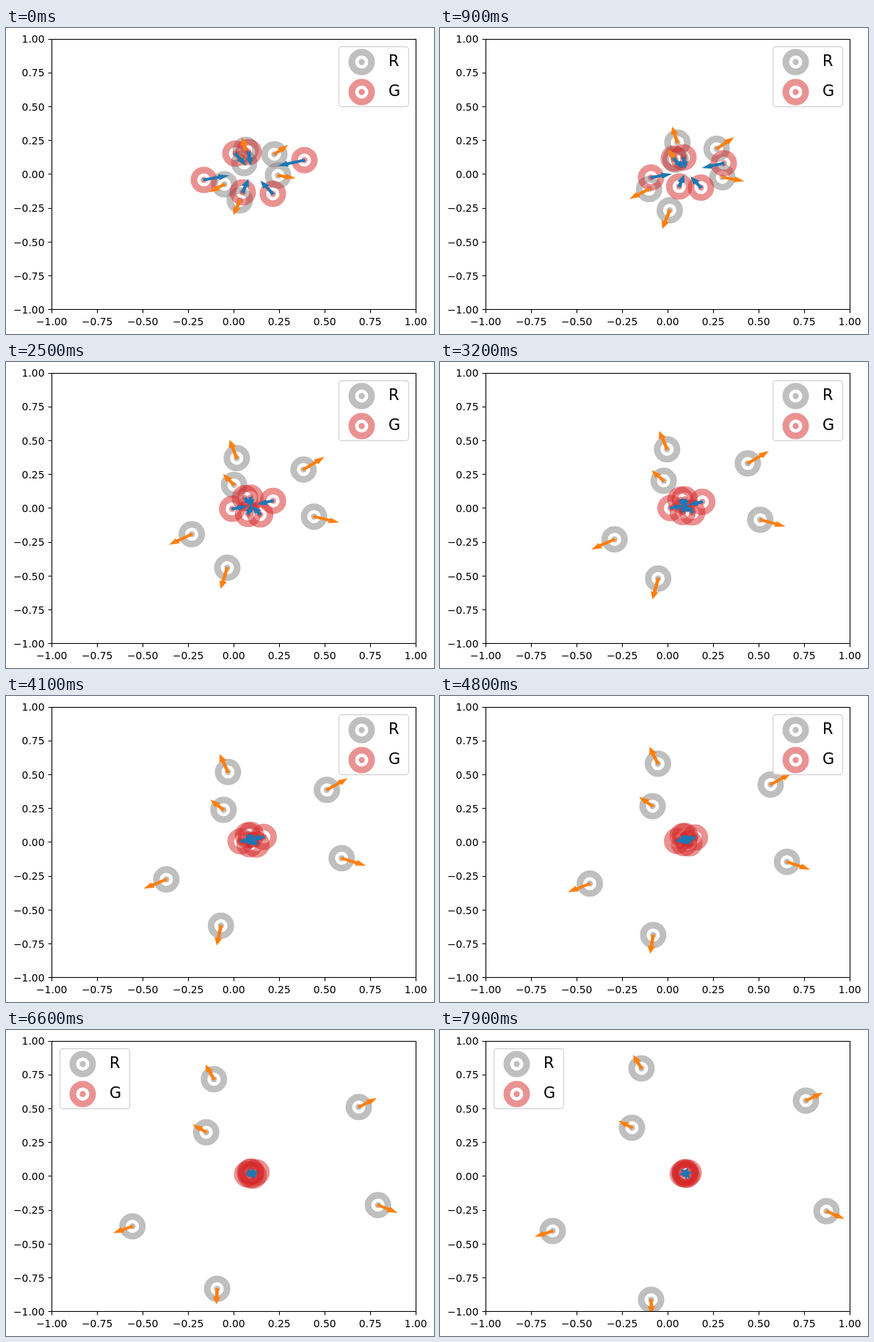
Animation, 583 px wide and 418 px high, one loop 8 s. Source, as an HTML page:

```html
<!DOCTYPE html>
<html lang="en">
<head>
<meta charset="utf-8">
<title>Agents</title>
<style>
  html, body { margin: 0; width: 100%; height: 100%; overflow: hidden; background: #fff; }
  svg { display: block; width: 583px; height: 418px; font: 13.89px "DejaVu Sans", sans-serif; }
  .axis { fill: none; stroke: #000; stroke-width: 1.1; }
  .arrow { stroke-width: 1.9; stroke-linejoin: miter; stroke-miterlimit: 10; vector-effect: non-scaling-stroke; }
</style>
</head>
<body>
<svg id="stage" viewBox="0 0 583 418">
  <clipPath id="plot"><rect x="62" y="15" width="497" height="370"/></clipPath>
  <g id="agents" clip-path="url(#plot)"></g>
  <g id="axes"><rect class="axis" x="62.5" y="15.5" width="496" height="369"/></g>
  <g id="legend" font-size="20.83">
    <rect x="453.5" y="25.5" width="95" height="82" rx="4" fill="#fff" stroke="#ccc" stroke-width="1.39" opacity=".8"/>
    <text x="521" y="52">R</text>
    <text x="521" y="93">G</text>
  </g>
</svg>
<script>
const GRAY = '#808080', RED = '#d62728', ORANGE = '#ff7f0e', BLUE = '#1f77b4';
const UNIT_X = 248, UNIT_Y = 184.8;   // pixels per data unit
const ARROW_SCALE = 0.92;             // arrow length per velocity
const SPAN = 7.9;                     // seconds from first to last pose
const CENTRE = [334, 195.4], RATE = 0.36;

const $ = id => document.getElementById(id);

function add(parent, tag, attrs, text = '') {
  const el = document.createElementNS('http://www.w3.org/2000/svg', tag);
  for (const key in attrs) el.setAttribute(key, attrs[key]);
  el.textContent = text;
  parent.append(el);
  return el;
}

function addMarker(parent, color, x = 0, y = 0) {
  const g = add(parent, 'g', { opacity: 0.5, transform: `translate(${x} ${y})` });
  add(g, 'circle', { r: 13.5, fill: 'none', stroke: color, 'stroke-width': 9 });
  add(g, 'circle', { r: 4.2, fill: color });
  return g;
}

// Axes
for (let i = 0; i <= 8; i++) {
  const label = (i / 4 - 1).toFixed(2).replace('-', '\u2212');
  const x = 62.5 + 62 * i, level = 384.6 - 46.2 * i;
  add($('axes'), 'path', { class: 'axis', d: `M${x} 384.5v5M62.5 ${Math.floor(level) + 0.5}h-5` });
  add($('axes'), 'text', { x: x - 0.3, y: 406, 'text-anchor': 'middle' }, label);
  add($('axes'), 'text', { x: 52.5, y: Math.round(level + 5.3), 'text-anchor': 'end' }, label);
}
addMarker($('legend'), GRAY, 484.5, 46.5);
addMarker($('legend'), RED, 484.5, 87.5);

// Gray agents speed up, then slow down, each along a quadratic curve
function ease(t) {
  const u = t / SPAN;
  return u + u * (1 - u) * (-0.4 + 1.38 * u - 0.72 * u * u);
}

function spread([start, bend, end], t) {
  const e = ease(t), r = 1 - e;
  return start.map((s, k) => r * r * s + 2 * r * e * bend[k] + e * e * end[k]);
}

// Red agents close in on their common centre
function gather(start, t) {
  return start.map((s, k) => CENTRE[k] + (s - CENTRE[k]) * Math.exp(-RATE * t));
}

const curves = [
  [[326, 166], [309, 109], [274, 52]],
  [[324, 184], [305.5, 156.5], [261, 133]],
  [[365, 172], [428.5, 129], [498, 96]],
  [[370, 201], [450, 213.5], [526, 247]],
  [[297, 213], [225, 250.5], [153, 274]],
  [[318, 235], [285, 312], [287, 368]]
];
const starts = [[312, 171], [330, 169], [406, 180], [269, 207], [322, 224], [363, 226]];

const agents = [
  ...curves.map(curve => ({ color: GRAY, tint: ORANGE, at: t => spread(curve, t) })),
  ...starts.map(start => ({ color: RED, tint: BLUE, at: t => gather(start, t) }))
];
for (const a of agents) a.marker = addMarker($('agents'), a.color);
for (const a of agents) a.arrow = add($('agents'), 'path', { class: 'arrow', fill: a.tint, stroke: a.tint });

function pose(agent, t) {
  const step = 0.01;
  const [x, y] = agent.at(t), [x1, y1] = agent.at(t + step);
  const dx = (x1 - x) / step / UNIT_X, dy = (y1 - y) / step / UNIT_Y;
  const len = ARROW_SCALE * Math.hypot(dx, dy);
  const angle = Math.atan2(dy, dx) * 180 / Math.PI;
  const place = `translate(${x + 0.5} ${y + 0.5})`;
  agent.marker.setAttribute('transform', place);
  agent.arrow.setAttribute('transform', `${place} scale(${UNIT_X} ${UNIT_Y}) rotate(${angle})`);
  agent.arrow.setAttribute('d', `M0-.0055H${len}V-.015L${len + 0.04} 0L${len} .015V.0055H0Z`);
}

function draw(now) {
  const t = Math.floor(now / 100) % 80 / 10;
  for (const agent of agents) pose(agent, t);
  // The legend jumps aside when an agent moves beneath it
  $('legend').setAttribute('transform', `translate(${t < 6.4 ? 0 : -380} 0)`);
  requestAnimationFrame(draw);
}
requestAnimationFrame(draw);
</script>
</body>
</html>
```
